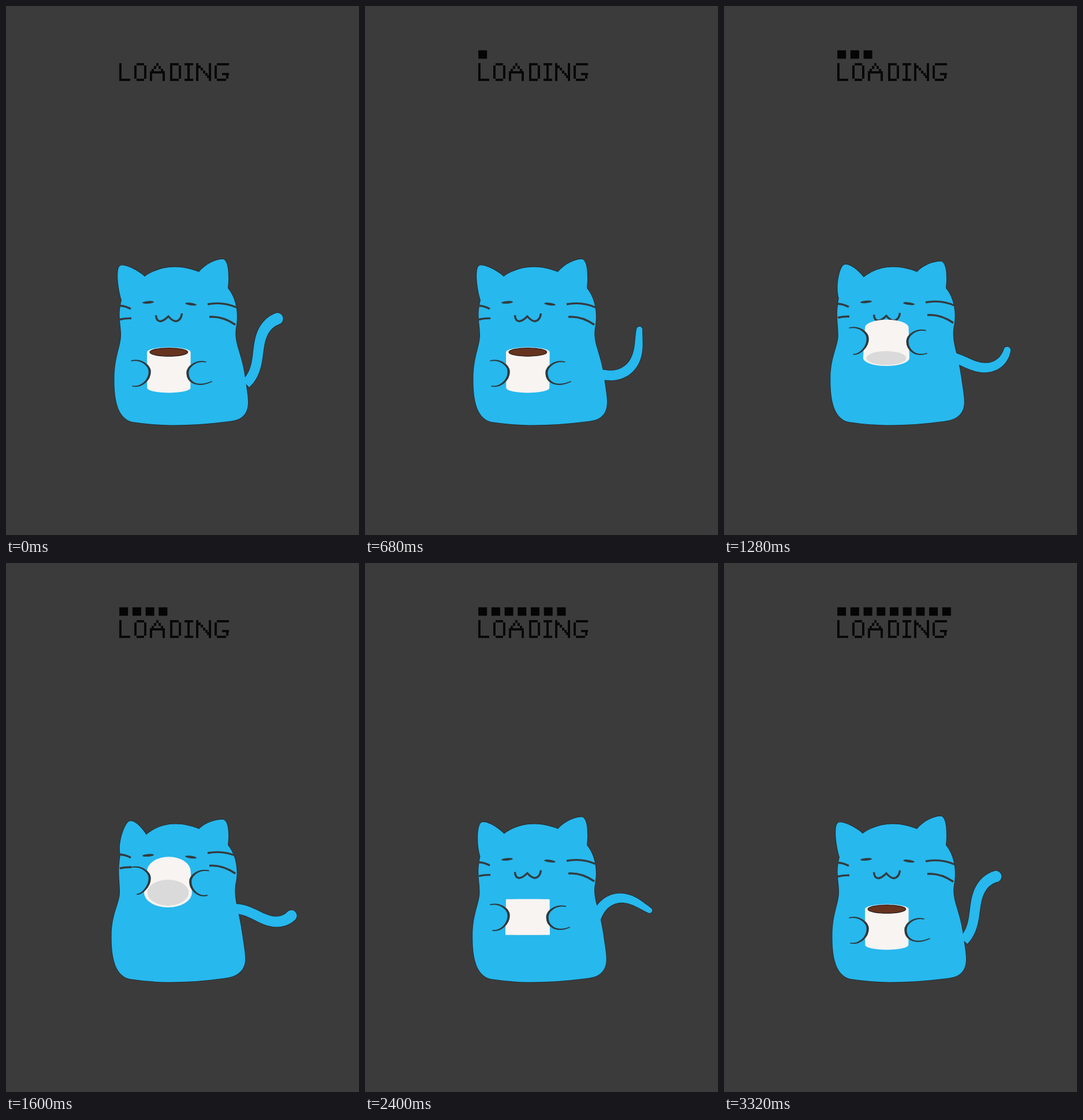
Recreate the animation shown at these times as an HTML page. Size 611 px wide and 917 px high, loop 3.36 s.

```html
<!DOCTYPE html>
<html lang="en">
<head>
<meta charset="utf-8">
<title>Loading</title>
<style>
  html, body { margin: 0; width: 100%; height: 100%; overflow: hidden; background: #3b3b3b; }
  svg { display: block; width: 100%; height: 100%; }
  .skin { fill: #27b8ed; }
  .line { fill: none; stroke: #343b3f; stroke-width: 3.4; }
  .ink { fill: #30383c; stroke: #30383c; stroke-width: 1.6; stroke-linejoin: round; }
  .type { fill: none; stroke: #080808; stroke-width: 3.6; stroke-linecap: square; shape-rendering: crispEdges; }
</style>
</head>
<body>
<svg viewBox="0 0 611 917" role="img" aria-label="LOADING">
  <g id="blocks" fill="#050505"></g>
  <path class="type" d="M198 101V128H213
    M224 105V124M241 105V124M228 101H237M228 128H237
    M262 101v1M258 106v1M266 106v1M254 111v1M270 111v1M251 115V128M273 115V128M254 115H270
    M286 101V128M286 101H297M286 128H297M301 105V124
    M311 101H322M316 101V128M311 128H322
    M331 101V128M353 101V128M335 105v1M339 109v1M343 114v1M347 118v1M350 122v1
    M363 105V124M367 101H384M367 128H379M383 119V124M376 118H384"/>
  <path id="edge" fill="none" stroke="#20282c" stroke-width="1.7"/>
  <path id="tail" class="skin"/>
  <path id="body" class="skin"/>
  <g id="eyes" fill="#343b3f">
    <ellipse cx="246" cy="513.7" rx="10" ry="2.2" transform="rotate(-5 246 513.7)"/>
    <ellipse cx="320" cy="516.7" rx="10" ry="2.2" transform="rotate(8 320 516.7)"/>
  </g>
  <path id="whiskers" class="line" d="M197 519.5Q207 520 216 525M197 543.5Q207 541 217 541.5
    M349 517Q375 512 399 522.5M352 539Q374 537 397 552.5"/>
  <path id="mouth" class="line" d="M259.5 536Q260 546 267 546.5Q273 546 281 538Q288 546 294 546.5Q303 545 304.5 533"/>
  <path id="mug" fill="#f8f4f2"/>
  <ellipse id="coffee" fill="#66331f" stroke="#251a18" stroke-width="1.2"/>
  <ellipse id="base" fill="#dadada"/>
  <g id="hands"></g>
</svg>
<script>
const LOOP = 3360, FRAME = 40, TAU = 2 * Math.PI;
const $ = id => document.getElementById(id);
const set = (el, attrs) => { for (const k in attrs) el.setAttribute(k, attrs[k]); };
const add = (parent, tag, attrs) => {
  const el = document.createElementNS('http://www.w3.org/2000/svg', tag);
  set(el, attrs);
  return parent.appendChild(el);
};
const wave = (t, peak, period = LOOP) => Math.cos(TAU * (t - peak) / period);

// The ears turn inwards and the hips slide left as the cat lifts the mug.
function bodyPath(p) {
  const ear = 15 * p, hip = -5 * p, dip = 6 * p;
  return `M${200 - 2 * p} ${510 - 5 * p}
    C193 488 ${190 + ear} 453 ${198 + ear} ${450 - 2 * p}
    S${230 + dip} 459 ${240 + p * 3} ${469 + p * 2}
    C268 449 302 448 334 461
    C346 ${446 + p * 3} 366 ${438 + dip} 376 ${439 + dip}
    C386 ${442 + dip} 386 472 384 489
    C398 506 403 532 ${398 - p} 558
    C394 585 ${408 + hip} 600 ${414 + hip} 645
    C${416 + hip} 660 ${419 + hip} 676 ${419 + hip} 686
    C${419 + hip} 708 ${408 + 2 * hip} 718 ${385 + 2 * hip} 720
    Q${330 + hip} 727 ${285 + hip} 726.5
    Q${252 + hip} 726 ${219 + hip} 721
    C${194 + hip} 715 ${187 + hip} 685 ${187.5 + hip} 645
    C${188 + hip} 607 ${199 - 2 * p} 590 ${199 - 2 * p} 570
    S193 538 ${200 - 2 * p} ${510 - 5 * p}Z`;
}

// A bend travels from root to tip; the tip swells twice per loop.
function tailPath(t) {
  const sway = wave(t, 60), length = 120 + 11 * sway;
  const tip = 7 + 3.3 * wave(t, 100, LOOP / 2);
  const steps = 28, step = length / steps, left = [], right = [];
  let x = 403 + 12 * sway, y = 627 + 28 * sway, w;
  for (let i = 0; i <= steps; i++) {
    const s = i / steps;
    const heading = (28 + (50 + 12 * s) * wave(t, 1600 * s - 660)) * TAU / 360;
    const dx = Math.cos(heading), dy = -Math.sin(heading);
    w = 8.6 + (tip - 8.6) * s ** 3;
    left.push([x + dy * w, y - dx * w]);
    right.unshift([x - dy * w, y + dx * w]);
    x += dx * step;
    y += dy * step;
  }
  return `M${left.join('L')}A${w} ${w} 0 0 1 ${right.join('L')}Z`;
}

// A paw curls around its knuckle at x, y; side is 1 for left, -1 for right.
function drawHand({ fill, ink }, side, x, y, reach, drop) {
  const at = (dx, dy) => `${x - side * dx} ${y + dy} `;
  const start = at(33, -19), end = at(reach, drop);
  const outer = `M${start}C${at(15, -23)}${at(0, -11)}${at(0, 0)}C${at(0, 14)}${at(14, 28)}${end}`;
  const back = `C${at(14, 27)}${at(2.5, 13)}${at(2.5, 0)}C${at(2.5, -10)}${at(15, -22)}${start}`;
  set(fill, { d: outer + 'Z' });
  set(ink, { d: outer + back + 'Z' });
}

function drawMug(p) {
  const tilt = 35 * p - 8.5, ry = Math.abs(tilt);
  const x = 281.8, rx = 37.8, top = 600 - 67 * p;
  const bx = x - 1.4 * p, brx = 37.5 + 4 * p, bottom = 662 - 60 * p - 34 * p * p;
  set($('mug'), { d: `M${x - rx} ${top}A${rx} ${ry} 0 0 1 ${x + rx} ${top}
    L${bx + brx} ${bottom}A${brx} ${ry} 0 0 1 ${bx - brx} ${bottom}Z` });
  set($('coffee'), { cx: x, cy: top, rx: 32.8, ry: ry * .84, visibility: tilt < 0 ? 'visible' : 'hidden' });
  set($('base'), { cx: bx, cy: bottom, rx: brx - 5.5, ry: ry * .88, visibility: tilt > 0 ? 'visible' : 'hidden' });
}

const [leftHand, rightHand] = [0, 1].map(() => ({
  fill: add($('hands'), 'path', { class: 'skin' }),
  ink: add($('hands'), 'path', { class: 'ink' })
}));
const blocks = Array.from({ length: 9 }, (_, i) =>
  add($('blocks'), 'rect', { x: 196.2 + 22.7 * i, y: 76.8, width: 15, height: 14.6 }));

function draw(t) {
  const lift = Math.max(0, 1 - Math.abs(t - 1710) / 1040);
  const p = (1 - Math.cos(Math.PI * lift)) / 2;
  const count = Math.floor((t - FRAME) / (LOOP / 10));
  blocks.forEach((b, i) => set(b, { visibility: i < count ? 'visible' : 'hidden' }));

  const body = bodyPath(p), tail = tailPath(t);
  set($('edge'), { d: body + tail });
  set($('body'), { d: body });
  set($('tail'), { d: tail });

  const nod = p ** 5;
  set($('eyes'), { transform: `translate(0 ${-8 * nod})` });
  set($('whiskers'), { transform: `translate(0 ${-3 * p - 13 * nod})` });
  set($('mouth'), { transform: `translate(0 ${-1.5 * p})` });
  drawMug(p);
  drawHand(leftHand, 1, 250, 634 - 90 * p, 31 - 8 * p, 25 + 3 * p);
  drawHand(rightHand, -1, 313 + 5 * p, 636 - 86 * p, 43 - 13 * p, 15 + 9 * p);
}

const start = performance.now();
function tick() {
  const t = (performance.now() - start) % LOOP;
  draw(Math.floor(t / FRAME) * FRAME);
  requestAnimationFrame(tick);
}
tick();
</script>
</body>
</html>
```
